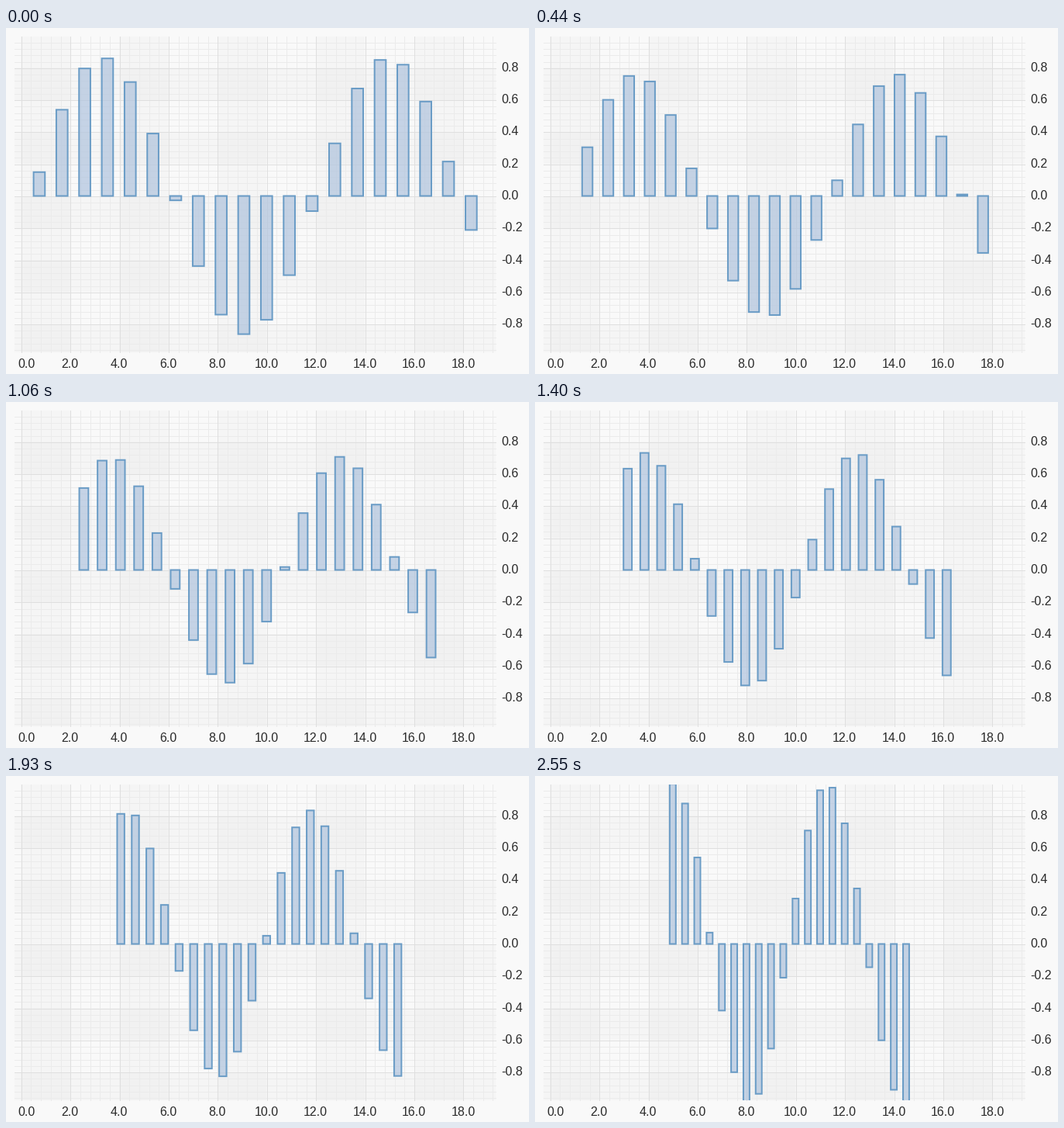
Write a matplotlib script that moves like this. It is 675 by 446 pixels and loops after 2.9 s.

```python
import numpy as np
import matplotlib.pyplot as plt
from matplotlib.animation import FuncAnimation
from matplotlib.collections import LineCollection, PolyCollection
from matplotlib.patches import Rectangle

W, H, DPI = 675, 446, 64
PX = 72 / DPI                              # points per pixel
LEFT, TOP, RIGHT, BOTTOM = 11, 11, 632, 418
X0, X_UNIT = 19.3, 31.7
Y0, Y_UNIT = 216.5, 206.3
LOOP, TICK = 2900, 10
BARS = np.arange(20)

# The blend advances in steps of 90 ms, a few of them 80 ms.
STEP_MS = [80 if k in (2, 5, 12, 15, 19, 24) else 90 for k in range(29)]
STARTS = np.concatenate([[0], np.cumsum(STEP_MS)])
BLEND = np.interp(np.arange(30), [0, 3, 8, 12, 16, 22, 28, 29],
                  [0.149, 0.244, 0.395, 0.512, 0.633, 0.813, 0.995, 1])


def px(x):
    return X0 + X_UNIT * x


def py(y):
    return Y0 - Y_UNIT * y


def grid(x_step, y_step, color):
    xs = [px(i * x_step) for i in range(-5, 60)]
    ys = [py(i * y_step) for i in range(-30, 30)]
    lines = [[(np.floor(x) + 0.5, TOP), (np.floor(x) + 0.5, BOTTOM)]
             for x in xs if LEFT <= x < RIGHT]
    lines += [[(LEFT, np.floor(y) + 0.5), (RIGHT, np.floor(y) + 0.5)]
              for y in ys if TOP <= y < BOTTOM]
    ax.add_collection(LineCollection(lines, colors=color, linewidths=PX,
                                     antialiaseds=False, capstyle="butt"))


def band(x, y, w, h):
    ax.add_patch(Rectangle((x, y), w, h, color="black", alpha=0.016,
                           linewidth=0, clip_path=plot_area))


def label(x, y, value, align):
    ax.text(x, y, f"{value:.1f}", ha=align, va="baseline", color="#2a2a2a",
            family="Liberation Sans", fontsize=16 * PX)


fig = plt.figure(figsize=(W / DPI, H / DPI), dpi=DPI, facecolor="#f9f9f9")
ax = fig.add_axes([0, 0, 1, 1])
ax.set(xlim=(0, W), ylim=(H, 0))
ax.axis("off")
plot_area = Rectangle((LEFT, TOP), RIGHT - LEFT, BOTTOM - TOP,
                      transform=ax.transData)

for x in range(0, 20, 4):
    band(px(x), TOP, min(px(x + 2), RIGHT) - px(x), BOTTOM - TOP)
for i in range(5):
    y = py(0.8 - 0.4 * i)
    band(LEFT, y, RIGHT - LEFT, min(y + 0.2 * Y_UNIT, BOTTOM) - y)

grid(0.4, 0.04, "#ebebeb")
grid(2, 0.2, "#dfdfdf")

for x in range(0, 20, 2):
    label(max(px(x), 26.5), 438, x, "center")
for i in range(-4, 5):
    label(639.5, py(i / 5) + 4.5, i / 5, "left")

bars = PolyCollection([], facecolors=(176 / 255, 196 / 255, 222 / 255, 0.7),
                      edgecolors="#6a9cc6", linewidths=2 * PX,
                      joinstyle="miter", zorder=3)
bars.set_snap(False)
ax.add_collection(bars)
bars.set_clip_path(plot_area)


def update(frame):
    step = np.searchsorted(STARTS, frame * TICK, side="right") - 1
    t = BLEND[step]
    gap = 1 - t / 2
    x = px(10 + (BARS - 10) * gap)
    y = py((1 - t) * np.sin(BARS / 2) + t * np.cos(BARS / 2))
    half = gap * X_UNIT / 4
    bars.set_verts([[(a - half, Y0), (a - half, b), (a + half, b), (a + half, Y0)]
                    for a, b in zip(x, y)])
    return [bars]


anim = FuncAnimation(fig, update, frames=LOOP // TICK, interval=TICK,
                     repeat=True, cache_frame_data=False)
plt.show()
```
